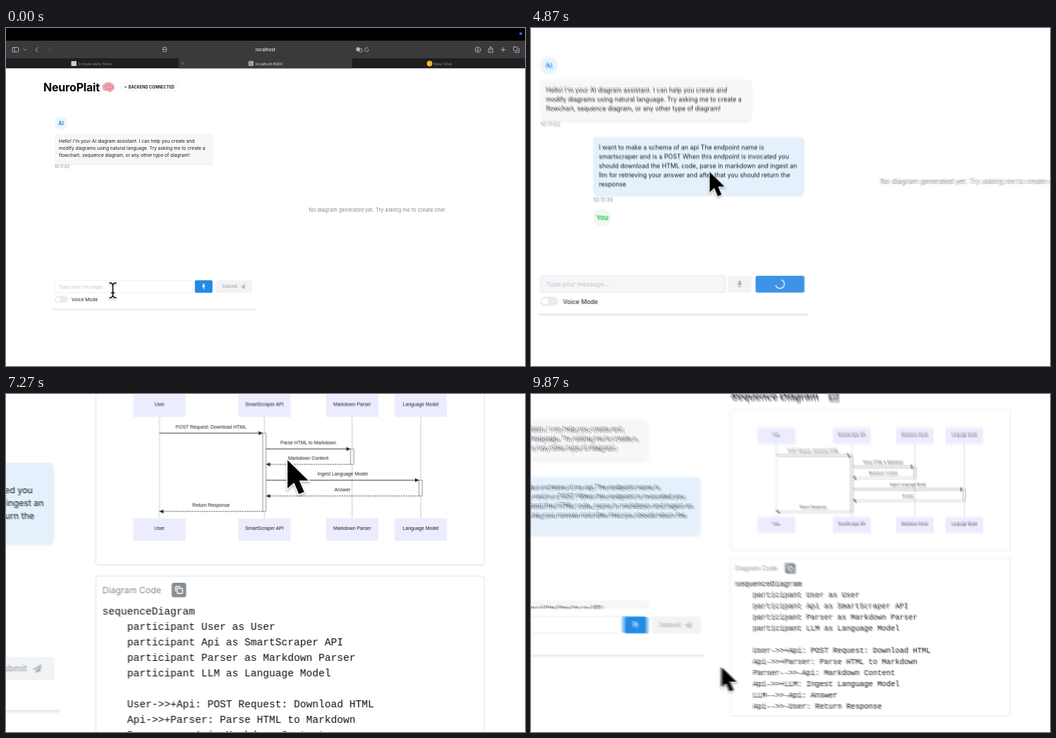
An HTML page that plays this animation: 736 by 480 pixels, repeating every 9.94 s.

```html
<!DOCTYPE html>
<html lang="en">
<head>
<meta charset="utf-8">
<title>Diagram assistant demo</title>
<style>
html, body { margin: 0; width: 100%; height: 100%; overflow: hidden; background: #fff; }
svg { display: block; width: 736px; height: 480px; }
text { font-family: Inter, sans-serif; font-size: 6.6px; fill: #1a1b1e; white-space: pre; }
.tab { font-size: 5.4px; fill: #8b8a8c; }
.icon { fill: none; stroke: #b9b8ba; stroke-width: .9; stroke-linecap: round; stroke-linejoin: round; }
.badge { font-size: 5.5px; font-weight: 700; letter-spacing: .1px; }
.title { font-size: 16px; font-weight: 700; letter-spacing: -.2px; fill: #000; }
.face { font-size: 7.1px; font-weight: 700; text-anchor: middle; }
.time { font-size: 5.8px; fill: #868e96; }
.dim { fill: #868e96; }
.hint { fill: #bfc5cb; }
.card { fill: #fff; stroke: #e3e5e8; stroke-width: .6; }
.mid { font-family: "Liberation Sans", Arial, sans-serif; font-size: 3.65px; text-anchor: middle; fill: #222; }
.code { font-family: "Liberation Mono", "Courier New", monospace; font-size: 7.8px; fill: #111; }
.msg { stroke: #333; stroke-width: .5; }
.life { stroke: #b4b4b8; stroke-width: .35; }
.run { fill: #f4f4f4; stroke: #777; stroke-width: .35; }
</style>
</head>
<body>
<svg viewBox="0 0 736 480">
  <defs>
    <linearGradient id="fade" x2="0" y2="1">
      <stop offset="0" stop-opacity=".1"/><stop offset="1" stop-opacity="0"/>
    </linearGradient>
    <clipPath id="chat"><path d="M60 120H360V349.8H60z"/></clipPath>
    <clipPath id="field"><path d="M70 358H260V376H70z"/></clipPath>
    <filter id="drop" x="-50%" y="-50%" width="200%" height="200%">
      <feDropShadow dx="0" dy="1" stdDeviation=".9" flood-opacity=".35"/>
    </filter>
    <g id="copy">
      <rect width="11" height="11" rx="1.8" fill="#868e96"/>
      <g fill="none" stroke="#fff" stroke-width=".8">
        <rect x="4.2" y="4.2" width="4" height="4" rx=".8"/>
        <path d="M3 6.6V3.5Q3 2.9 3.6 2.9H6.6"/>
      </g>
    </g>
    <path id="mic" d="M-1.2 -2.4a1.2 1.2 0 0 1 2.4 0v2a1.2 1.2 0 0 1 -2.4 0zM-2.3 -.6a2.3 2.3 0 0 0 4.6 0h-.6a1.7 1.7 0 0 1 -3.4 0zM-.3 1.6h.6v1.2h1v.6h-2.6v-.6h1z"/>
  </defs>

  <g id="base"><g id="world">
    <path d="M-400 -400H1200V900H-400z" fill="#fff"/>

    <g id="chrome">
      <path d="M0 0H736V18H0z" fill="#000"/>
      <path d="M0 18H736V43H0z" fill="#3a393b"/>
      <path d="M0 43H736V57.3H0z" fill="#1f1e20"/>
      <path d="M245 43H491V57.3H245z" fill="#3a393b"/>
      <circle cx="730" cy="8" r="2" fill="#2f6fd8"/>
      <g class="icon">
        <rect x="9" y="27.5" width="8.6" height="6.6" rx="1.2"/><path d="M12 27.5v6.6"/>
        <path d="M25.2 30l1.6 1.6 1.6 -1.6M45 27.6l-3 3.2 3 3.2"/>
        <path d="M60.5 27.6l3 3.2 -3 3.2" stroke="#59585a"/>
        <rect x="222.6" y="27.6" width="5" height="6" rx="1"/><path d="M222.6 30.5h5"/>
        <rect x="497" y="28" width="4.4" height="4.4" rx="1" fill="#b9b8ba"/><rect x="500.4" y="29.6" width="4.6" height="4.4" rx="1"/>
        <path d="M513.8 30.2a2.5 2.5 0 1 1 -1.5 -1.6l-.8 -1.2"/>
        <circle cx="669" cy="30.8" r="3.8"/><path d="M669 28.8v3.6m-1.5 -1.4l1.5 1.5 1.5 -1.5"/>
        <path d="M685.6 29.6h-1.4v5h6.2v-5h-1.4M687.3 32.2v-5.4m-1.6 1.5l1.6 -1.6 1.6 1.6"/>
        <path d="M702 30.8h6M705 27.8v6"/>
        <rect x="719.6" y="26.8" width="5.6" height="5.6" rx="1"/><path d="M727.6 29v5.6h-5.6"/>
        <path d="M249 49l2.6 2.6m0 -2.6l-2.6 2.6" stroke-width=".5"/>
      </g>
      <text x="368" y="33.1" text-anchor="middle" style="font-size:6.4px;font-weight:500;fill:#f0f0f0">localhost</text>
      <rect x="92.5" y="47" width="7.4" height="7" fill="#dcc6c8"/>
      <text class="tab" x="102" y="52.5">Scheda dello Store</text>
      <rect x="343.8" y="46.8" width="7.2" height="7.2" rx="1.4" fill="#aaa9ab"/>
      <text class="tab" x="347.4" y="52.4" text-anchor="middle" style="fill:#333">L</text>
      <text class="tab" x="354" y="52.5" style="fill:#e6e6e6">localhost:8000</text>
      <circle cx="600.7" cy="50.5" r="3.9" fill="#f2b92f"/>
      <text class="tab" x="607" y="52.5">New Chat</text>
    </g>

    <text class="title" x="53" y="90">NeuroPlait</text>
    <path d="M137 86q-1.500 -5 3 -7.500q5 -3 9.500 -.5q4.500 2.500 4.300 7q-.3 3.500 -3.800 4q-.6 2.500 -3 2.500q-1.600 -2 -3.600 -2.200q-5 .6 -6.400 -3.300z" fill="#f2a3b3"/>
    <path d="M140 84q2 -3 4.500 -1.200M146 79.500q.3 3 3.300 2.800M143 87.500q3 -2.800 6 -.6M150 85q2 0 2.400 -2" fill="none" stroke="#cf6f88" stroke-width=".9" stroke-linecap="round"/>
    <rect x="163" y="78" width="82" height="11.600" rx="5.800" fill="#fff" stroke="#e6e8eb" stroke-width=".6"/>
    <circle cx="169.500" cy="83.800" r="1.300" fill="#40a060"/>
    <text class="badge" x="173.800" y="85.900">BACKEND CONNECTED</text>

    <g id="talk" clip-path="url(#chat)"></g>

    <path d="M66 398.500H354L352 402H68z" fill="url(#fade)"/>
    <rect id="input" x="69" y="358.300" width="196" height="17.600" rx="2" stroke="#dfe2e6" stroke-width=".5"/>
    <g clip-path="url(#field)"><text id="typed" x="75" y="369.600"></text></g>
    <rect id="micBox" x="267.800" y="358.200" width="25" height="17.800" rx="2"/>
    <use id="micIcon" href="#mic" x="280.300" y="366.800"/>
    <rect id="send" x="297.200" y="358.200" width="51.800" height="17.800" rx="2"/>
    <g id="label">
      <text x="306" y="369.400" style="font-weight:600;fill:inherit">Submit</text>
      <path d="M332.800 367.600l6.600 -3.800 -1.100 6.400 -2 -.8 -1.300 1.500v-2.200l3.200 -3.500 -4 3.100z"/>
    </g>
    <path id="spin" d="M0 -4.600A4.600 4.600 0 1 1 -3.980 2.300" fill="none" stroke="#e6f1fc" stroke-width="1.100"/>
    <rect x="69" y="380.600" width="19" height="9.600" rx="4.800" fill="#e9ecef"/>
    <circle cx="74" cy="385.400" r="3.700" fill="#fff" stroke="#dee2e6" stroke-width=".4"/>
    <text x="93" y="388">Voice Mode</text>

    <text id="empty" class="dim" x="429.500" y="260.700" style="font-size:7.350px">No diagram generated yet. Try asking me to create one!</text>
    <g id="result"></g>

    <g id="cursor" filter="url(#drop)">
      <path id="arrow" d="M0 0V21.500L4.900 17 8.600 25.800 12.600 24.100 8.900 15.500H15.800z" fill="#000" stroke="#fff" stroke-width="1.500" paint-order="stroke"/>
      <g id="beam" fill="none" stroke-linecap="round">
        <path d="M-4.500 -10.500Q0 -10.500 0 -6.500V6.500Q0 10.500 -4.500 10.500M4.500 -10.500Q0 -10.500 0 -6.500M0 6.500Q0 10.500 4.500 10.500M-2 3.500H2" stroke="#fff" stroke-width="3.200"/>
        <path d="M-4.500 -10.500Q0 -10.500 0 -6.500V6.500Q0 10.500 -4.500 10.500M4.500 -10.500Q0 -10.500 0 -6.500M0 6.500Q0 10.500 4.500 10.500M-2 3.500H2" stroke="#000" stroke-width="1.500"/>
      </g>
    </g>
  </g></g>
  <use class="ghost" href="#world" opacity=".5"/>
  <use class="ghost" href="#world" opacity=".3333"/>
  <use class="ghost" href="#world" opacity=".25"/>
</svg>

<script>
const $ = id => document.getElementById(id);
const LOOP = 9940, STEP = 1000 / 15;
const PASTE = 1330, SENT = 2000, DONE = 5860;

// --- static markup -------------------------------------------------
const text = (cls, x, y, str) =>
  `<text class="${cls}" x="${x}" y="${y}">${str.replace(/>/g, '&gt;')}</text>`;
const lines = (cls, x, y, gap, list) =>
  list.map((s, i) => text(cls, x, y + i * gap, s)).join('');
const face = (x, y, name, bg, ink) =>
  `<circle cx="${x}" cy="${y}" r="9.2" fill="${bg}"/>
   <text class="face" x="${x}" y="${y + 2.6}" style="fill:${ink}">${name}</text>`;
const bubble = (x, y, w, h, bg) =>
  `<path d="M${x + 1} ${y + h - 1}h${w - 2}l-2 4h${6 - w}z" fill="url(#fade)"/>
   <rect x="${x}" y="${y}" width="${w}" height="${h}" rx="4" fill="${bg}"/>`;
const aiFace = y => face(78, y, 'AI', '#e7f5ff', '#228be6');

const request = [
  'I want to make a schema of an api The endpoint name is',
  'smartscraper and is a POST When this endpoint is invocated you',
  'should download the HTML code, parse in markdown and ingest an',
  'llm for retrieving your answer and after that you should return the',
  'response'
];

$('talk').innerHTML =
  aiFace(135) + bubble(69, 150.3, 225, 42.4, '#f6f7f8') +
  lines('', 75, 163.2, 9.85, [
    "Hello! I'm your AI diagram assistant. I can help you create and",
    'modify diagrams using natural language. Try asking me to create a',
    'flowchart, sequence diagram, or any other type of diagram!'
  ]) + text('time', 69, 199.2, '10:11:02') +
  '<g id="asked">' + bubble(125, 211, 224, 61, '#e4f1fd') +
  lines('', 131, 224.3, 9.78, request) + text('time', 125, 279.6, '10:11:35') +
  face(134.7, 296.5, 'You', '#ebfbee', '#40c057') + '</g>' +
  '<g id="reply">' + aiFace(326) + bubble(69, 341, 225, 40, '#f6f7f8') +
  text('', 75, 351.6, "I've created a sequence diagram of the flow for an API:") + '</g>';

const actors = [[428.75, 'User'], [508.25, 'SmartScraper API'],
                [574.75, 'Markdown Parser'], [626.75, 'Language Model']];
const actor = ([x, name]) =>
  `<path class="life" d="M${x} 176V253"/>` + [159.2, 253.2].map(y =>
    `<rect x="${x - 19.75}" y="${y}" width="39.5" height="17" fill="#ececff"/>` +
    text('mid', x, y + 8.7, name)).join('');
const run = (x, y, h) => `<rect class="run" x="${x - 1.3}" y="${y}" width="2.6" height="${h}"/>`;
const message = (from, to, y, name, dashed) => {
  const d = Math.sign(to - from);
  return `<path class="msg" d="M${from} ${y}H${to}" ${dashed ? 'stroke-dasharray="1 .8"' : ''}/>
    <path d="M${to} ${y}l${-3 * d} -1.5v3z" fill="#222"/>` +
    text('mid', (from + to) / 2, y - 3.5, name);
};

$('result').innerHTML =
  `<text x="381" y="129.6" style="font-size:10px;font-weight:700">Sequence Diagram</text>
   <use href="#copy" x="483.700" y="120.400"/>
   <rect class="card" x="380.500" y="141" width="294.500" height="147.500" rx="2"/>
   <rect class="card" x="380.500" y="297" width="294.500" height="166.400" rx="2"/>` +
  actors.map(actor).join('') +
  run(508.25, 188.5, 59.4) + run(574.75, 200.5, 11.7) + run(626.75, 224.2, 12) +
  message(428.75, 506.9, 188.5, 'POST Request: Download HTML') +
  message(509.6, 573.4, 200.5, 'Parse HTML to Markdown') +
  message(573.4, 509.6, 212.2, 'Markdown Content', true) +
  message(509.6, 625.4, 224.2, 'Ingest Language Model') +
  message(625.4, 509.6, 236.2, 'Answer', true) +
  message(506.9, 428.75, 247.9, 'Return Response', true) +
  text('dim', 385.5, 309.9, 'Diagram Code') + '<use href="#copy" x="438" y="302"/>' +
  text('code', 385.5, 326.3, 'sequenceDiagram') +
  lines('code', 404.3, 338, 11.72, [
    'participant User as User',
    'participant Api as SmartScraper API',
    'participant Parser as Markdown Parser',
    'participant LLM as Language Model',
    '',
    'User->>+Api: POST Request: Download HTML',
    'Api->>+Parser: Parse HTML to Markdown',
    'Parser-->>-Api: Markdown Content',
    'Api->>+LLM: Ingest Language Model',
    'LLM-->>-Api: Answer',
    'Api-->>-User: Return Response'
  ]);

// --- motion ----------------------------------------------------------
// Critically damped spring from 0 to 1
const spring = (t, start) => {
  const u = Math.max(0, t - start) * .0057;
  return 1 - (1 + u) * Math.exp(-u);
};

// Zoom s around the fixed point (x, y)
function camera(t) {
  const s = 1 + spring(t, 350) - spring(t, 4468) + spring(t, 6640) - spring(t, 9475);
  const a = spring(t, 1000), b = spring(t, 7775);
  const [x, y] = t < 6600 ? [20 + 214 * a, 476 - 99 * a] : [671 - 9 * b, 341 + 139 * b];
  return [s, x * (1 - s), y * (1 - s)];
}

const moves = [[1250, 1650, 323, 368], [2000, 2450, 248.5, 248], [6000, 6900, 525.8, 209],
               [7700, 8400, 514.5, 399], [9000, 9700, 371, 411.5]];
function pointer(t) {
  let x = 151.5, y = 372.5;
  for (const [t0, t1, x1, y1] of moves) {
    const k = Math.min(1, Math.max(0, (t - t0) / (t1 - t0)));
    const e = k * k * (3 - 2 * k);
    x += (x1 - x) * e;
    y += (y1 - y) * e;
  }
  return [x, y];
}

const show = (id, on) => $(id).setAttribute('display', on ? 'inline' : 'none');
const fill = (id, color) => $(id).setAttribute('fill', color);
const ghosts = [...document.querySelectorAll('.ghost')];
const views = [$('base'), ...ghosts];

function draw(t) {
  const busy = t >= SENT && t < DONE, typed = t >= PASTE && t < SENT;
  show('asked', t >= SENT);
  show('reply', t >= DONE);
  show('result', t >= DONE);
  show('empty', t < DONE);
  show('label', !busy);
  show('spin', busy);
  fill('input', busy ? '#f5f6f8' : '#fff');
  fill('micBox', busy ? '#f1f3f5' : '#228be6');
  fill('micIcon', busy ? '#a5acb3' : '#fff');
  fill('send', busy ? '#3d93e8' : typed ? '#228be6' : '#f1f3f5');
  fill('label', typed ? '#fff' : '#adb5bd');
  $('typed').textContent = typed ? request.slice(0, 2).join(' ') : 'Type your message...';
  $('typed').setAttribute('class', typed ? '' : 'hint');
  $('spin').setAttribute('transform', `translate(323 367) rotate(${(t - 2600) / 745 * 360})`);

  const beam = t < 1330 || t > 8100 && t < 9150;
  show('beam', beam);
  show('arrow', !beam);
  $('cursor').setAttribute('transform', `translate(${pointer(t)})`);

  // Blend four close moments while the camera is fast
  const [s0, x0, y0] = camera(t - 8), [s1, x1, y1] = camera(t + 8);
  const drift = Math.abs(s1 - s0) * 400 + Math.abs(x1 - x0) + Math.abs(y1 - y0);
  const blur = drift > 1;
  ghosts.forEach(g => g.setAttribute('display', blur ? 'inline' : 'none'));
  views.forEach((v, i) => {
    const [s, x, y] = camera(blur ? t + i * 4 - 6 : t);
    v.setAttribute('transform', `matrix(${s} 0 0 ${s} ${x} ${y})`);
  });
}

let last = -1;
const began = performance.now();
function tick(now) {
  const t = Math.max(0, now - began) % LOOP;
  const step = Math.floor((t + 4) / STEP);
  if (step !== last) draw((last = step) * STEP);
  requestAnimationFrame(tick);
}
tick(began);
</script>
</body>
</html>
```
